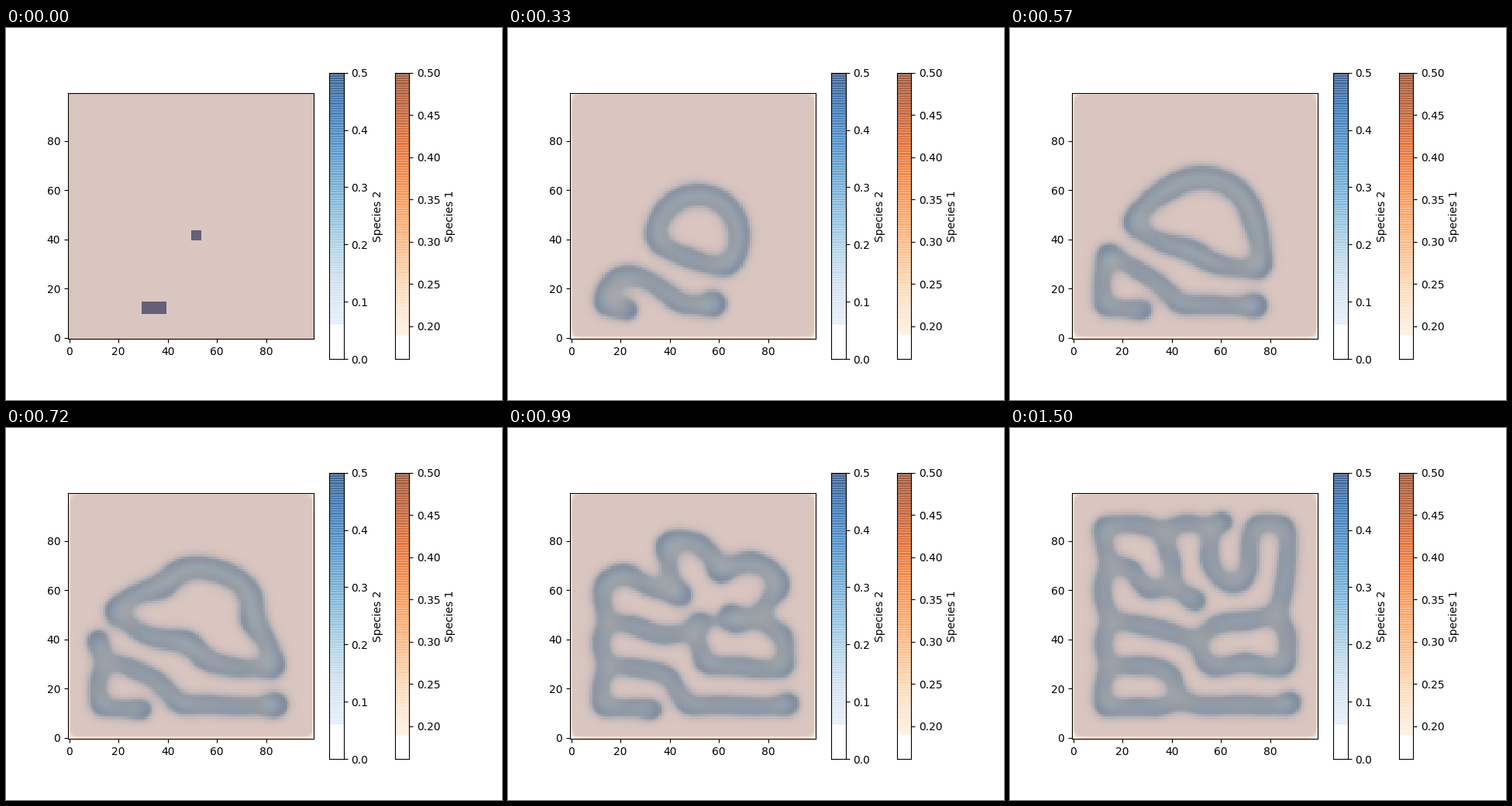
Animation, 640 px wide and 480 px high, one loop 1.53 s. Source, as a matplotlib script:

```python
import numpy as np
import matplotlib.pyplot as plt
from matplotlib.animation import FuncAnimation

W, H, DPI = 640, 480, 100
FRAMES, INTERVAL = 51, 30

# Gray-Scott reaction on a square grid
N = 100
FEED, KILL = 0.055, 0.062
SPREAD = np.array([1.0, 0.5]).reshape(2, 1, 1)
ALPHA = 0.5
TOP, LOW_1, LOW_2 = 0.5, 0.161, 0.0


def seed():
    """Species 1 everywhere, species 2 in a square and a rectangle."""
    state = np.zeros((2, N, N))
    state[0] = 1
    state[1, 40:44, 50:54] = 1
    state[1, 10:15, 30:40] = 1
    return state


padded = np.zeros((2, N + 2, N + 2))


def laplacian(state):
    """Nine-point stencil, with empty space beyond the walls."""
    padded[:, 1:-1, 1:-1] = state
    rows = padded[:, :-2] + padded[:, 2:]
    sides = rows[:, :, 1:-1] + padded[:, 1:-1, :-2] + padded[:, 1:-1, 2:]
    corners = rows[:, :, :-2] + rows[:, :, 2:]
    return 0.2 * sides + 0.05 * corners - state


def step(state):
    u, v = state
    made = u * v * v
    new = state + SPREAD * laplacian(state)
    new[0] += FEED * (1 - u) - made
    new[1] += made - (FEED + KILL) * v
    return np.clip(new, 0, 1, out=new)


def find_pace(row=63, col=51, frames=11, limit=3000):
    """Steps per frame that bring the upper front to a row in time."""
    state, count = seed(), 0
    while state[1, row, col] < 0.12 and count < limit:
        state = step(state)
        count += 1
    return max(10, 10 * round(count / frames / 10))


def run():
    pace, state = find_pace(), seed()
    history = [state]
    for _ in range(FRAMES - 1):
        for _ in range(pace):
            state = step(state)
        history.append(state)
    return history


def add_axes(x, y, w, h):
    return fig.add_axes([x / W, y / H, w / W, h / H])


def colour_bar(x, cmap, low, ticks, fmt, blank, label):
    """Bar of 256 translucent cells; rows where two cells meet are denser."""
    base, height = 52.8, 369.6
    ax = add_axes(x, base, 18.48, height)
    row = np.arange(370)
    joints = np.floor(base + np.arange(257) * height / 256 + 0.5) - 53
    cover = np.where(np.isin(row, joints), 1 - (1 - ALPHA) ** 2, ALPHA)
    level = (row + 0.5) / 370
    rgb = plt.get_cmap(cmap)(level)[:, :3]
    rgb = 1 - cover[:, None] * (1 - rgb)
    rgb[level < blank] = 1
    ax.imshow(rgb[:, None], origin="lower", aspect="auto",
              interpolation="nearest", extent=(0, 1, low, TOP))
    ax.set_xticks([])
    ax.yaxis.tick_right()
    ax.yaxis.set_label_position("right")
    ax.set_yticks(ticks, [fmt % t for t in ticks])
    ax.set_ylim(low, TOP)
    ax.set_ylabel(label)


plt.rcParams["font.family"] = "DejaVu Sans"
fig = plt.figure(figsize=(W / DPI, H / DPI), dpi=DPI, facecolor="white")
history = run()

main = add_axes(80, 78.88, 317.44, 317.44)
layers = [
    main.imshow(field, cmap=cmap, vmin=low, vmax=TOP, alpha=ALPHA,
                origin="lower", interpolation="nearest")
    for field, cmap, low in zip(history[0], ("Oranges", "Blues"),
                                (LOW_1, LOW_2))
]
main.set_xticks(range(0, N, 20))
main.set_yticks(range(0, N, 20))

colour_bar(501.6, "Oranges", LOW_1, np.arange(4, 11) * 0.05, "%.2f",
           0.085, "Species 1")
colour_bar(417.28, "Blues", LOW_2, np.arange(6) * 0.1, "%.1f",
           0.12, "Species 2")


def update(frame):
    for layer, field in zip(layers, history[frame]):
        layer.set_data(field)
    return layers


anim = FuncAnimation(fig, update, frames=FRAMES, interval=INTERVAL,
                     repeat=True, repeat_delay=0, blit=False)
plt.show()
```
